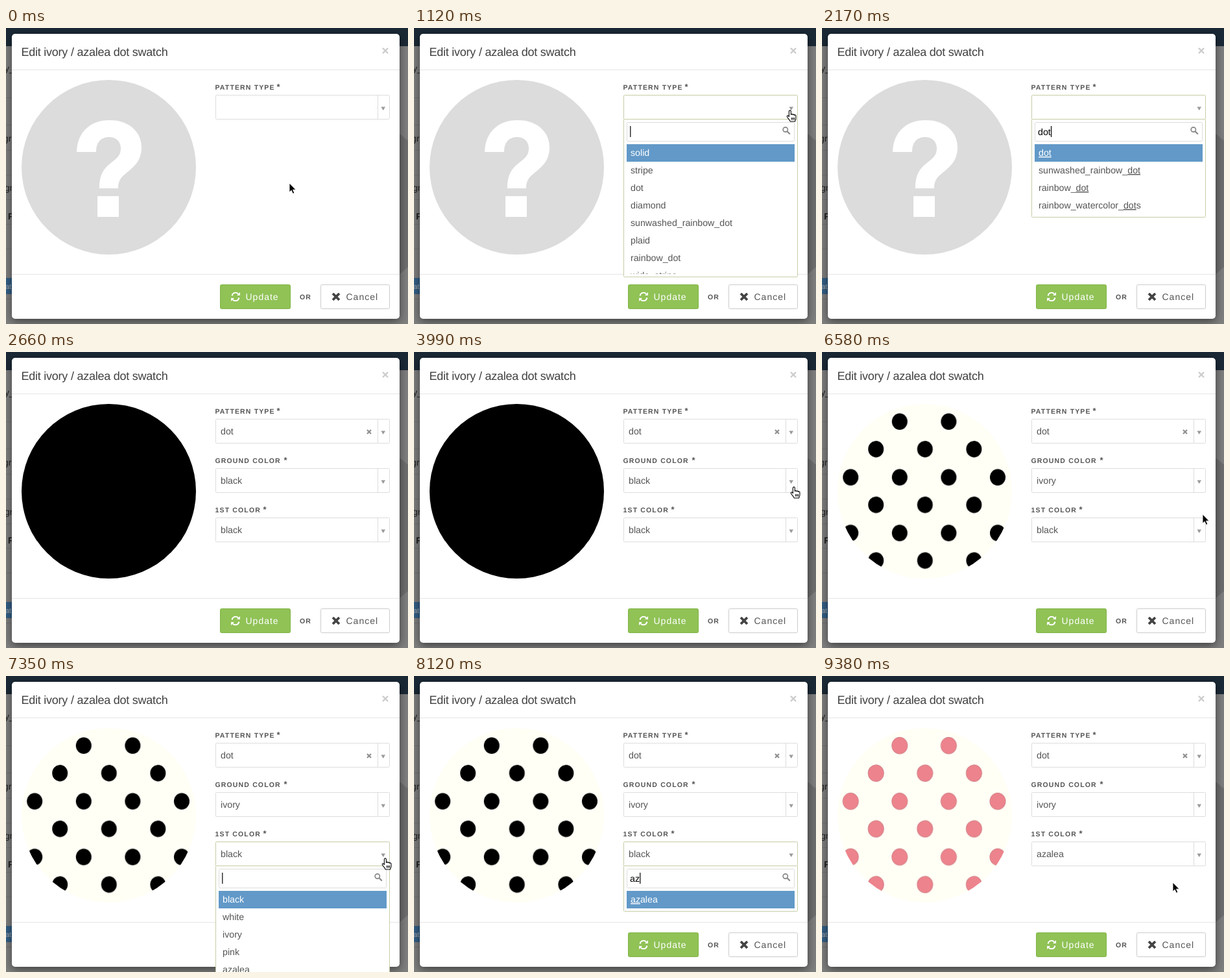
An HTML page for the animation above (9450 ms loop, 620x456 px).

```html
<!DOCTYPE html>
<html lang="en">
<head>
<meta charset="utf-8">
<title>Edit swatch</title>
<style>
html, body { margin: 0; width: 100%; height: 100%; overflow: hidden; background: #7f7f7f; }
svg { display: block; }
text { font: 14.2px "Liberation Sans", Arial, sans-serif; fill: #555; white-space: pre; text-rendering: geometricPrecision; }
.label { font-size: 10.5px; font-weight: bold; letter-spacing: 1.15px; }
.star { font-size: 13px; font-weight: bold; }
.title { font-size: 18px; letter-spacing: -.24px; fill: #404040; }
.button { font-size: 14px; letter-spacing: 1px; }
.page text { fill: #222; font-size: 14px; }
.page path { stroke: #727272; }
.hit { text-decoration: underline; }
.modal { filter: drop-shadow(0 4px 7px rgba(0, 0, 0, .5)); }
</style>
</head>
<body>
<svg id="stage" width="620" height="456" viewBox="0 0 620 456">
  <defs>
    <clipPath id="disc"><circle cx="158.5" cy="214.5" r="134.5"/></clipPath>
    <pattern id="dots" x="6.4" y="86" width="75.6" height="85.8" patternUnits="userSpaceOnUse">
      <g id="dotInk">
        <ellipse cx="37.8" cy="21.2" rx="12" ry="12.7"/>
        <ellipse cx="1.2" cy="63.7" rx="12" ry="12.7"/>
        <ellipse cx="76.8" cy="63.7" rx="12" ry="12.7"/>
      </g>
    </pattern>
  </defs>

  <g class="page">
    <rect width="620" height="456" fill="#7f7f7f"/>
    <rect width="620" height="28" fill="#1b2936"/>
    <circle cx="527" cy="271" r="134.5" fill="#6e6e6e"/>
    <path d="M0 107.5H9M0 149.5H9M0 188.5H9M0 226.5H9M0 264.5H9M0 302.5H9M0 340.5H9M0 417.5H9"/>
    <text x="-2" y="67">y_</text>
    <text x="-4" y="175">gra</text>
    <text x="-2" y="251">gr</text>
    <text x="3" y="295" class="label">F</text>
    <rect y="385" width="12" height="25" fill="#335f86"/>
    <text x="-1" y="402" style="font-size:11px;fill:#aaa">at</text>
  </g>

  <rect class="modal" x="9" y="9" width="598" height="439" rx="5" fill="#fff"/>
  <path d="M9 64.5H607M9 379.5H607" stroke="#e5e5e5"/>
  <text class="title" x="23.5" y="43">Edit ivory / azalea dot swatch</text>
  <path d="M581 31l8 8m0-8l-8 8" stroke="#ccc" stroke-width="2.4"/>

  <rect x="330.5" y="395.5" width="108" height="37" rx="2" fill="#90c256" stroke="#80b344"/>
  <g fill="none" stroke="#fff" stroke-width="2">
    <path d="M348.6 412.5a5.6 5.6 0 0 1 10-2.6M359.4 415.500a5.600 5.600 0 0 1-10 2.600"/>
    <path d="M361 407v5h-5zM347 421v-5h5z" fill="#fff" stroke="none"/>
  </g>
  <text class="button" x="369.500" y="419" style="fill:#fff">Update</text>
  <text class="label" x="453" y="418">OR</text>
  <rect x="485.500" y="395.500" width="106" height="37" rx="2" fill="#fff" stroke="#ccc"/>
  <path d="M504 409l10 10m0-10l-10 10" stroke="#444" stroke-width="3.800"/>
  <text class="button" x="524.500" y="419">Cancel</text>

  <g id="form"></g>

  <circle id="ring" r="29.500" fill="none" stroke="#555" stroke-opacity=".7" stroke-width="3"/>
  <path id="arrow" d="M0 0V14L3.200 11.200 5.400 16.300 7.800 15.300 5.600 10.200H10Z" fill="#000" stroke="#fff" stroke-width=".9"/>
  <path id="hand" fill="#fff" stroke="#000" stroke-width="1.100" stroke-linejoin="round"
    d="M-1.600 9.500V1.400a1.500 1.500 0 0 1 3 0V6.500a1.400 1.400 0 0 1 2.700.3 1.400 1.400 0 0 1 2.600.6 1.300 1.300 0 0 1 2.300.9V12c0 2-1.300 3-1.300 5H.3C-.5 14.600-3 12.600-4.600 9.800-5.400 8.300-3.600 7.300-2.600 8.500ZM2.500 11v3.500M4.500 11v3.500M6.500 11v3.500"/>
</svg>

<script>
const LOOP = 9450, TICK = 70;
const $ = id => document.getElementById(id);

const patterns = ['solid', 'stripe', 'dot', 'diamond', 'sunwashed_rainbow_dot', 'plaid', 'rainbow_dot',
  'wide_stripe', 'rainbow_watercolor_dots', 'faded_check', 'floral', 'braid'];
const colors = ['black', 'white', 'ivory', 'pink', 'azalea', 'heather-olive', 'navy', 'olive',
  'coral', 'light-gray', 'mint', 'aqua', 'brick', 'lilac'];
const fields = [
  { label: 'PATTERN TYPE', star: 417.5, y: 103, list: patterns },
  { label: 'GROUND COLOR', star: 428.5, y: 179, list: colors },
  { label: '1ST COLOR', star: 396.5, y: 255, list: colors }
];

// Each entry changes part of the form state from its time on.
const changes = [
  [0, { open: -1, typed: '', filter: '', values: [''] }],
  [1120, { open: 0 }],
  [1680, { typed: 'd' }],
  [1750, { filter: 'd' }],
  [2030, { typed: 'do', filter: 'do' }],
  [2170, { typed: 'dot', filter: 'dot' }],
  [2660, { open: -1, typed: '', filter: '', values: ['dot', 'black', 'black'] }],
  [4480, { open: 1 }],
  [4970, { typed: 'i' }],
  [5040, { filter: 'i' }],
  [5250, { typed: 'iv', filter: 'iv' }],
  [5810, { open: -1, typed: '', filter: '', values: ['dot', 'ivory', 'black'] }],
  [7070, { open: 2 }],
  [7630, { typed: 'a' }],
  [7700, { filter: 'a' }],
  [8050, { typed: 'az' }],
  [8120, { filter: 'az' }],
  [8610, { open: -1, typed: '', filter: '', values: ['dot', 'ivory', 'azalea'] }]
];

// Pointer runs: time, x, y; the pointer is hidden between runs.
const runs = [
  { end: 1680, path: [[0, 437, 239], [140, 462, 218], [350, 548, 152], [560, 580, 127]] },
  { end: 4970, path: [[3220, 580, 128], [3360, 561, 146], [3570, 582, 196], [3710, 588, 218], [3920, 587, 212], [3990, 586, 208]] },
  { end: 7630, path: [[6440, 588, 212], [6510, 592, 230], [6580, 587, 250], [6650, 588, 260], [6860, 585, 281]] },
  { end: LOOP, path: [[9170, 582, 284], [9310, 556, 308], [9380, 541, 318]] }
];
const clicks = [[980, 1120], [4410, 4550], [7000, 7140]];

const box = (x, y, w, h, fill, stroke, r = 1) =>
  `<rect x="${x + .5}" y="${y + .5}" width="${w - 1}" height="${h - 1}" rx="${r}" fill="${fill}" stroke="${stroke}"/>`;
const text = (x, y, s, attrs = '') => `<text x="${x}" y="${y}" ${attrs}>${s}</text>`;

function swatch([pattern, ground]) {
  if (!pattern) return `<circle cx="158.5" cy="214.5" r="134.5" fill="#dcdcdc"/>
    <path fill="#fff" d="M109 191C110 160 130 142 160 142C190 142 209 160 209 184C209 203 199 213 186 223
      C176 231 173 236 173 247H144C144 226 150 217 163 207C173 199 177 195 177 185C177 175 170 168 159 168
      C146 168 139 177 139 191ZM141 259H174V291H141Z"/>`;
  const disc = fill => `<rect x="24" y="80" width="269" height="269" fill="${fill}" clip-path="url(#disc)"/>`;
  return disc(ground === 'ivory' ? '#fffff6' : '#000') + disc('url(#dots)');
}

function select(f, value, open, clearable) {
  const y = f.y, border = open ? '#c6cda6' : '#ddd';
  return text(322.5, y - 8, f.label, 'class="label"') + text(f.star, y - 8, '*', 'class="star"') +
    box(323, y, 269, 38, '#fff', border) +
    (open ? '' : `<path d="M573.5 ${y}v38" stroke="#ddd"/>`) +
    `<path d="M578.5 ${y + 18.500}h6.500l-3.250 5.500z" fill="#999"/>` +
    text(331, y + 24, value) +
    (clearable ? `<path d="M557 ${y + 17}l6 6m0-6l-6 6" stroke="#909090" stroke-width="2.200"/>` : '');
}

function option(name, query, i, active) {
  const at = name.indexOf(query), end = at + query.length;
  const words = name.slice(0, at) + `<tspan class="hit">${name.slice(at, end)}</tspan>` + name.slice(end);
  return (active ? `<rect y="${i * 27}" width="259" height="27" fill="#6299c8"/>` : '') +
    text(6, i * 27 + 18, words, active ? 'style="fill:#fff"' : '');
}

function dropdown(f, typed, filter) {
  const y = f.y + 37, hits = f.list.filter(s => s.includes(filter));
  const h = Math.min(200, hits.length * 27);
  return box(323, y, 269, h + 44, '#fff', '#c6cda6') +
    box(328, y + 5, 259, 30, '#fff', '#ddd') +
    text(333, y + 25, typed, 'id="query" style="fill:#000"') +
    `<path id="caret" d="M0 ${y + 11}v17" stroke="#000" stroke-width="1.200"/>` +
    `<g fill="none" stroke="#888"><circle cx="572.800" cy="${y + 16.500}" r="3.600" stroke-width="1.700"/>
      <path d="M575.500 ${y + 19.200}l4.300 4.300" stroke-width="2.200"/></g>` +
    `<svg x="328" y="${y + 39}" width="259" height="${h}">` +
    hits.map((s, i) => option(s, filter, i, i === 0)).join('') + '</svg>';
}

function drawForm({ open, typed, filter, values }) {
  const ink = values[2] === 'azalea' ? ['#ed838c', '#cf7a82'] : ['#000', 'none'];
  $('dotInk').setAttribute('fill', ink[0]);
  $('dotInk').setAttribute('stroke', ink[1]);
  $('form').innerHTML = swatch(values) +
    values.map((v, i) => select(fields[i], v, i === open, i === 0 && v)).join('') +
    (open < 0 ? '' : dropdown(fields[open], typed, filter));
  if (open >= 0) {
    const w = typed ? $('query').getComputedTextLength() : 0;
    $('caret').setAttribute('transform', `translate(${333.8 + w})`);
  }
}

function pointer(t) {
  const run = runs.find(r => t >= r.path[0][0] && t < r.end);
  if (!run) return null;
  const i = run.path.findIndex(p => p[0] > t);
  if (i < 0) return run.path[run.path.length - 1].slice(1);
  const [a, b] = [run.path[i - 1], run.path[i]], k = (t - a[0]) / (b[0] - a[0]);
  return [a[1] + (b[1] - a[1]) * k, a[2] + (b[2] - a[2]) * k];
}

function place(id, p, shown) {
  $(id).style.display = shown ? '' : 'none';
  if (shown) $(id).setAttribute('transform', `translate(${p[0]} ${p[1]})`);
}

let drawn = -1;
function frame() {
  const t = Math.floor(performance.now() % LOOP / TICK) * TICK;
  const active = changes.filter(c => c[0] <= t);
  if (active.length !== drawn) {
    drawn = active.length;
    drawForm(Object.assign({}, ...active.map(c => c[1])));
  }
  const p = pointer(t);
  const onField = p && p[0] < 592 && fields.some((f, i) =>
    (i === 0 || t > 2660) && p[0] > 323 && p[1] >= f.y && p[1] < f.y + 38);
  place('arrow', p, p && !onField);
  place('hand', p, onField);
  place('ring', p, p && clicks.some(([a, b]) => t >= a && t < b));
  requestAnimationFrame(frame);
}
frame();
</script>
</body>
</html>
```
